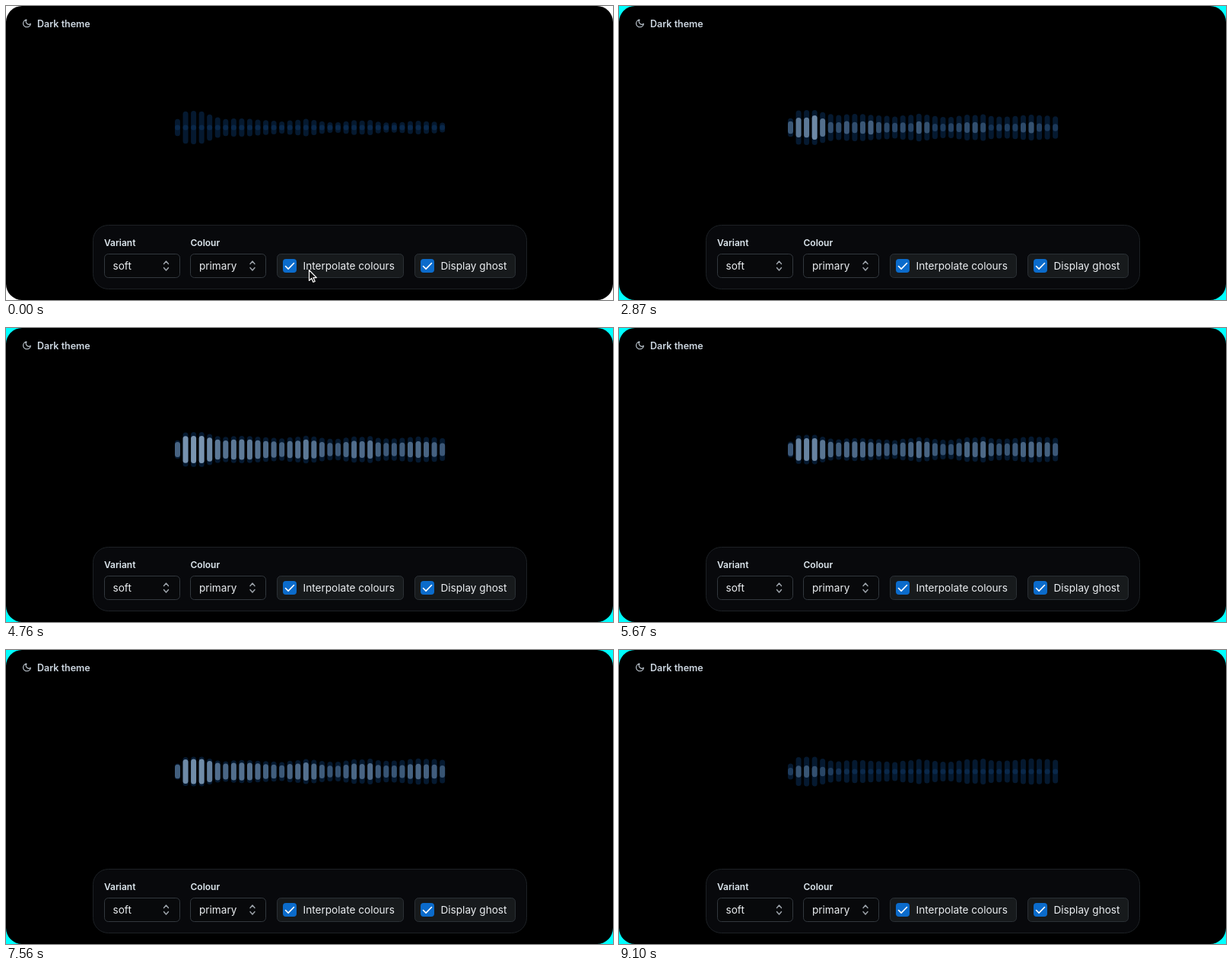
An HTML page that plays this animation: 798 by 387 pixels, repeating every 9170 ms.

```html
<!DOCTYPE html>
<html lang="en">
<head>
<meta charset="utf-8">
<title>Voice visualiser</title>
<style>
  html, body { margin: 0; width: 100%; height: 100%; overflow: hidden; background: #fff; }
  svg { display: block; width: 798px; height: 387px; font-family: Inter, sans-serif; font-size: 13.6px; fill: #eceff2; }
  .label { font-size: 12px; font-weight: 600; fill: #dde7ee; }
  .title { font-size: 12.5px; fill: #cdd7e1; }
  .line { fill: none; stroke-linecap: round; stroke-linejoin: round; }
  .field { fill: #08090b; stroke: #32383e; }
  .check { fill: #171a1c; stroke: #2b3035; }
</style>
</head>
<body>
<svg viewBox="0 0 798 387">
  <rect id="corners" width="798" height="387" fill="#fff"/>
  <rect width="798" height="387" rx="21" fill="#000"/>

  <path class="line" stroke="#cdd7e1" stroke-width="2" transform="translate(21 16.5) scale(.54)"
    d="M21 12.8A9 9 0 1 1 11.2 3 7 7 0 0 0 21 12.8z"/>
  <text class="label title" x="41" y="28">Dark theme</text>

  <g id="ghosts" fill="#051930"/>
  <g id="bars"/>

  <rect x="114.5" y="288.5" width="570" height="84" rx="20" fill="#08090c" stroke="#1d2125"/>
  <text class="label" x="129" y="316">Variant</text>
  <text class="label" x="242.5" y="316">Colour</text>

  <rect class="field" x="129.5" y="326.5" width="99" height="31" rx="5"/>
  <rect class="field" x="242.5" y="326.5" width="99" height="31" rx="5"/>
  <text x="140.5" y="347">soft</text>
  <text x="254" y="347">primary</text>
  <g class="line" stroke="#9fa6ad" stroke-width="1.4">
    <path id="arrows" d="M207.5 339.5l3-3.5 3 3.5m-6 5l3 3.5 3-3.5"/>
    <use href="#arrows" x="113.5"/>
  </g>

  <rect class="check" x="356.5" y="326.5" width="166" height="31" rx="5"/>
  <rect class="check" x="537.5" y="326.5" width="132" height="31" rx="5"/>
  <g id="tick">
    <rect x="364" y="333" width="18" height="18" rx="4" fill="#0b6bcb"/>
    <path class="line" stroke="#fff" stroke-width="1.6" d="M367.5 342.5l3.6 3.6 7.4-7.6"/>
  </g>
  <use href="#tick" x="181"/>
  <text x="390.5" y="347">Interpolate colours</text>
  <text x="571.5" y="347">Display ghost</text>

  <path id="cursor" fill="#111" stroke="#fff" stroke-width="1.2" stroke-linejoin="round"
    d="M398.5 347.5v14l3.2-3 2.2 5 2.3-1-2.2-4.9h4.3z"/>
</svg>
<script>
const LOOP = 9170, STEP = 70, COUNT = 34, MID = 160, DOT = 7;

// Loudness over time: bass peak, then the body at its left and right end.
const voice = [
  { at: 1540, bass: 0, left: 0, right: 0 },
  { at: 1960, bass: 27, left: 13, right: -1 },
  { at: 3640, bass: 14, left: 7, right: 6 },
  { at: 4760, bass: 30, left: 19, right: 11 },
  { at: 5670, bass: 24, left: 12, right: 11 },
  { at: 7560, bass: 27, left: 15, right: 10 },
  { at: 9100, bass: 9, left: 0, right: 0 }
];
const peaks = [
  { at: 1960, bass: 38, left: 16, right: 7 },
  { at: 2900, bass: 40, left: 27, right: 24 },
  { at: 4760, bass: 40, left: 27, right: 24 },
  { at: 5670, bass: 33, left: 19, right: 25 }
];

const lerp = (a, b, p) => a + (b - a) * p;
const clamp = (v, lo, hi) => Math.min(hi, Math.max(lo, v));
const jitter = i => Math.sin(i * i * 12.9 + 4) * 1.2;

function levelAt(keys, t) {
  const next = keys.findIndex(key => key.at >= t);
  const b = keys[next < 0 ? keys.length - 1 : next];
  const a = keys[Math.max(0, next < 0 ? keys.length - 1 : next - 1)];
  const p = a === b ? 0 : (t - a.at) / (b.at - a.at);
  const mix = name => lerp(a[name], b[name], p);
  return { p, bass: mix("bass"), left: mix("left"), right: mix("right") };
}

// A bass hump near the left, a sloping body, and ripples for the formants.
function spectrum(level, i) {
  const hump = Math.exp(-(((i - 1.8) / 3) ** 2));
  const body = lerp(level.left, level.right, i / (COUNT - 1));
  const ripple = 3 * Math.cos((i - 16) * 0.86) * (1 - hump) + jitter(i);
  const rise = lerp(body, level.bass, hump) + ripple * clamp(body / 6, 0, 1);
  return DOT + Math.max(0, rise) * (i ? 1 : 0.5);
}

function shade(height) {
  const p = clamp((height - DOT) / 30, 0, 1) ** 0.75;
  return `rgb(${lerp(10, 124, p)}, ${lerp(40, 151, p)}, ${lerp(74, 179, p)})`;
}

function makeBars(id) {
  const group = document.getElementById(id);
  return Array.from({ length: COUNT }, (_, i) => {
    const bar = document.createElementNS("http://www.w3.org/2000/svg", "rect");
    bar.setAttribute("x", 222 + i * 10.55);
    bar.setAttribute("width", DOT);
    bar.setAttribute("rx", DOT / 2);
    return group.appendChild(bar);
  });
}

function setHeight(bar, height) {
  bar.setAttribute("y", MID - height / 2);
  bar.setAttribute("height", height);
}

const ghosts = makeBars("ghosts");
const bars = makeBars("bars");
const corners = document.getElementById("corners");
const cursor = document.getElementById("cursor");

function draw(time) {
  const t = Math.floor(time / STEP) * STEP;
  const level = levelAt(voice, t);
  const peak = levelAt(peaks, t);
  const swing = 0.13 * Math.sin(Math.PI * level.p) ** 2;

  for (let i = 0; i < COUNT; i++) {
    const wobble = Math.sin(t / 115 + i * 0.7) + Math.sin(t / 73 - i * 1.9);
    const height = Math.max(DOT, spectrum(level, i) * (1 + swing * wobble));
    setHeight(bars[i], height);
    bars[i].setAttribute("fill", shade(height));
    setHeight(ghosts[i], Math.max(height, spectrum(peak, i)));
  }
  corners.setAttribute("fill", t < 1050 ? "#fff" : "#0ff");
  cursor.setAttribute("opacity", clamp(1 - t / 280, 0, 1));
}

const start = performance.now();
function tick() {
  draw((performance.now() - start) % LOOP);
  requestAnimationFrame(tick);
}
tick();
</script>
</body>
</html>
```
